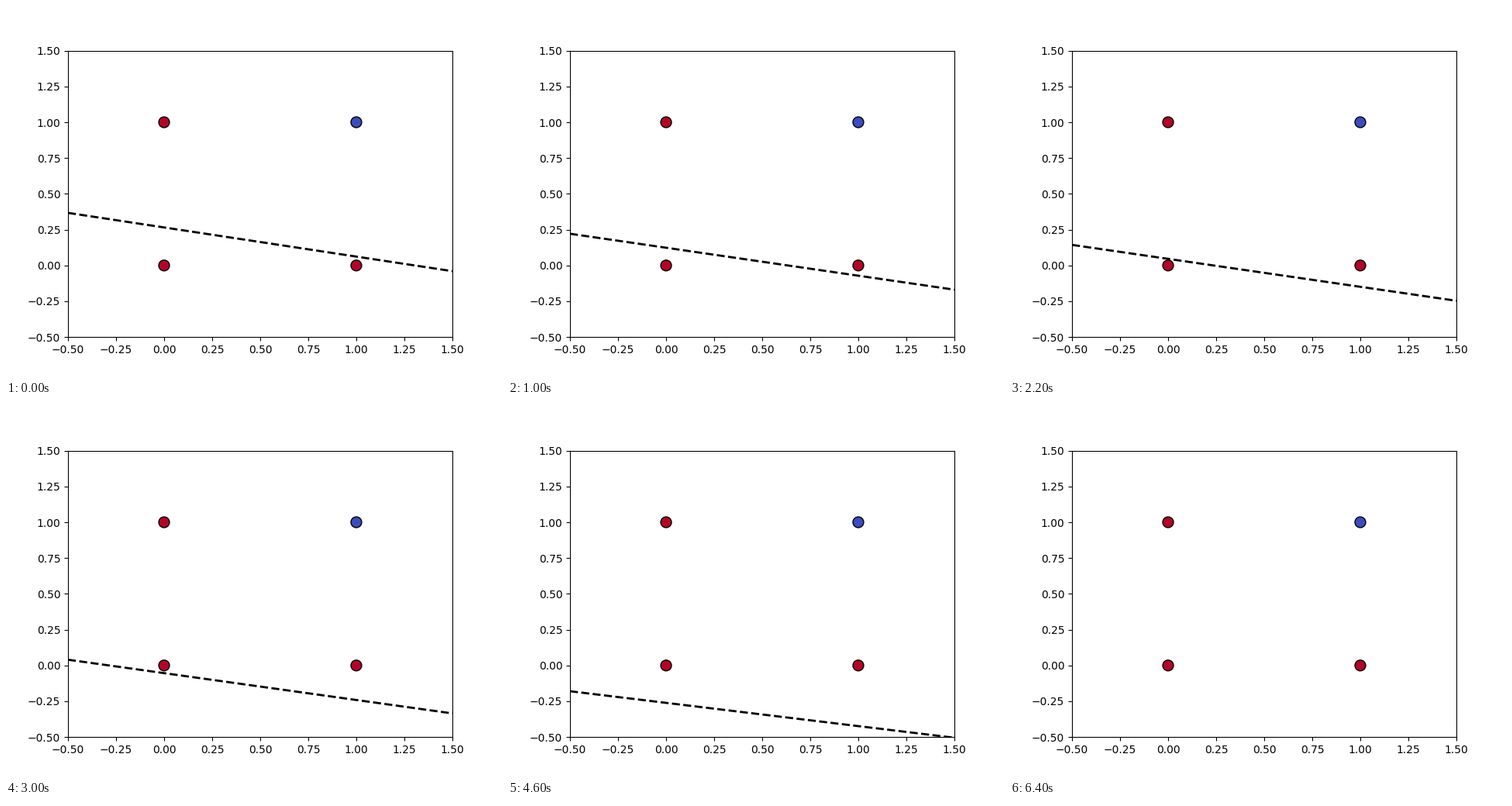
A matplotlib script for the animation above (8 s loop, 640 by 480 pixels).

```python
import numpy as np
import matplotlib.pyplot as plt
from matplotlib.animation import FuncAnimation

FRAMES, INTERVAL = 40, 200
RATE = 0.5

# NAND truth table
X = np.array([[0, 0], [0, 1], [1, 0], [1, 1]])
Y = np.array([1, 1, 1, 0])


def sigmoid(z):
    return 1 / (1 + np.exp(-z))


def train(steps):
    """Weights (w0, w1, bias) of one sigmoid neuron, one sample per step."""
    w = np.array([0.1913, 0.94, -0.2496])
    states = [w.copy()]
    for n in range(1, steps):
        x, y = np.append(X[n % 4], 1), Y[n % 4]
        s = sigmoid(w @ x)
        w += RATE * (y - s) * s * (1 - s) * x
        states.append(w.copy())
    return states


states = train(FRAMES)

fig, ax = plt.subplots(figsize=(6.4, 4.8), dpi=100)
ax.scatter(X[:, 0], X[:, 1], c=Y, cmap="coolwarm", s=100, edgecolors="k")
ax.set_xlim(-0.5, 1.5)
ax.set_ylim(-0.5, 1.5)

xs = np.array([-0.5, 1.5])
line, = ax.plot([], [], "k--", lw=2)


def update(n):
    w0, w1, b = states[n]
    line.set_data(xs, -(w0 * xs + b) / w1)
    return line,


anim = FuncAnimation(fig, update, frames=FRAMES, interval=INTERVAL,
                     repeat=True, repeat_delay=0)
plt.show()
```
